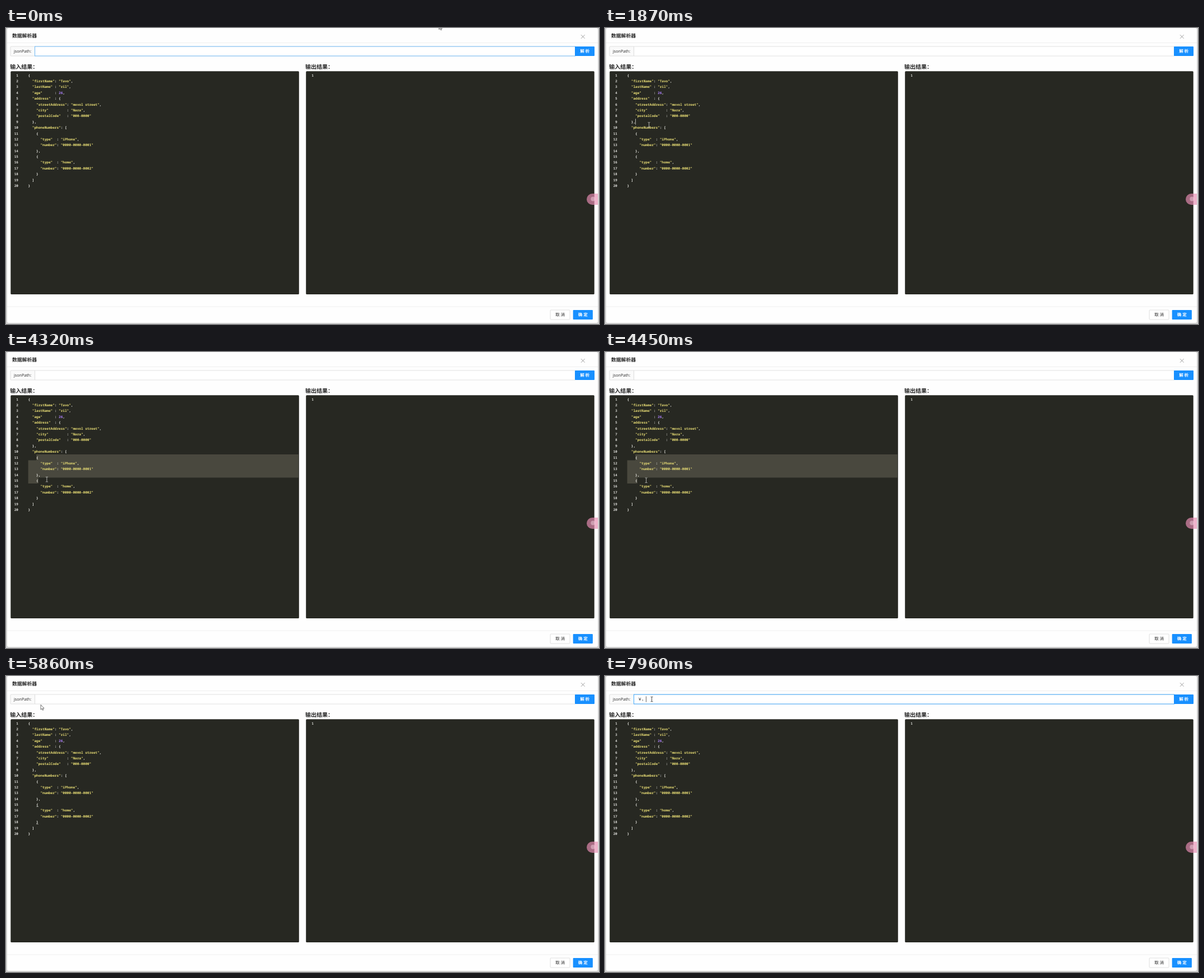
An HTML page that plays this animation: 1058 by 529 pixels, repeating every 8 s.

```html
<!DOCTYPE html>
<html lang="zh-CN">
<head>
<meta charset="utf-8">
<title>数据解析器</title>
<style>
  html, body { margin: 0; height: 100%; overflow: hidden; background: #d2d2d2; }
  svg { display: block; width: 100vw; height: 100vh; }
  text { white-space: pre; text-rendering: geometricPrecision;
    font: 7.6px "Noto Sans CJK SC", "Noto Sans CJK", sans-serif; fill: #262626; }
  .title { font-size: 8.8px; font-weight: 600; }
  .label { font-size: 10px; font-weight: 700; }
  .latin { font: 7.2px "Open Sans", sans-serif; }
  .mid { text-anchor: middle; }
  .white { fill: #fff; font-weight: 600; }
  .code text { font: 600 6.05px "Noto Sans Mono", monospace; fill: #f8f8f2; }
  .code .num { text-anchor: end; fill: #d8d8d4; }
  .str { fill: #e6db74; }
  .int { fill: #ae81ff; }
  .box { stroke: #d9d9d9; stroke-width: .8; fill: #fff; }
</style>
</head>
<body>
<svg viewBox="0 0 1058 529">
  <rect x="2" y="0" width="1054" height="527" rx="3" fill="#fefefe"/>
  <path d="M2 26.5H1056M2 498H1056" stroke="#eee" stroke-width=".9"/>
  <text class="title" x="11" y="16.9">数据解析器</text>
  <path d="M1026 12.2l6.6 6.6m0-6.6l-6.6 6.6" stroke="#858585" stroke-width=".8"/>

  <rect class="box" x="8" y="33" width="43.5" height="17" rx="1" style="fill:#fafafa"/>
  <text class="latin" x="14" y="44.1">jsonPath:</text>
  <rect class="box" x="51.5" y="33" width="964" height="17"/>
  <rect id="focus" x="51.5" y="33" width="964" height="17" fill="none" stroke="#40a9ff"/>
  <text id="typed" x="58.5" y="44.2" style="font-size:7.3px"></text>
  <rect x="1015" y="33" width="35" height="17" rx="1" fill="#1890ff"/>
  <text class="mid white" x="1032.6" y="44.3">解 析</text>

  <text class="label" x="7.2" y="73">输入结果：</text>
  <text class="label" x="534" y="73">输出结果：</text>
  <g fill="#272822">
    <rect x="8.3" y="77.3" width="514.5" height="398.6" rx="1.5"/>
    <rect x="535.2" y="77.3" width="514.5" height="398.6" rx="1.5"/>
  </g>
  <path id="selection" fill="#49483e"/>
  <g class="code" id="code"><text class="num" x="549" y="86.7">1</text></g>
  <path id="brackets" stroke="#f8f8f2" stroke-width=".6"/>
  <rect id="caret" width=".7" height="10.4"/>

  <path d="M1056 296h-10a10 10 0 0 0 0 20h10z" fill="#e88eb2" opacity=".68"/>
  <circle cx="1047.3" cy="305.6" r="4" fill="#f3cfde" opacity=".5"/>

  <rect class="box" x="971.2" y="504" width="34.8" height="17" rx="1"/>
  <text class="mid" x="988.7" y="515.3">取 消</text>
  <rect x="1011.7" y="504" width="35.2" height="17" rx="1" fill="#1890ff"/>
  <text class="mid white" x="1029.3" y="515.3">确 定</text>

  <path id="arrow" d="M0 0V8.6L2 6.8L3.4 9.8L4.7 9.2L3.4 6.3H6Z" fill="#fff" stroke="#333" stroke-width=".7"/>
  <path id="beam" d="M-2-4.3H-.5L0-3.9L.5-4.3H2M0-3.9V3.9M-2 4.3H-.5L0 3.9L.5 4.3H2" fill="none" stroke-width=".8"/>
</svg>
<script>
const $ = id => document.getElementById(id);
const LOOP = 8000, BLINK = 530, FADE = 300, FOCUS = 6130;
const LEFT = 39.6, RIGHT = 521.8, TOP = 79.2, CHAR = 3.63, ROW = 10.38;
const lines = `{
  "firstName": "Tavo",
  "lastName" : "ril",
  "age"      : 26,
  "address"  : {
    "streetAddress": "mevol street",
    "city"         : "Nara",
    "postalCode"   : "000-0000"
  },
  "phoneNumbers": [
    {
      "type"  : "iPhone",
      "number": "0000-0000-0001"
    },
    {
      "type"  : "home",
      "number": "0000-0000-0002"
    }
  ]
}`.split("\n");

const colX = col => LEFT + col * CHAR;
const rowY = row => TOP + row * ROW;
const clamp = (v, lo, hi) => Math.max(lo, Math.min(hi, v));
const between = (v, a, b) => v >= a && v < b;
const show = (el, on) => el.style.display = on ? "" : "none";
const place = (el, x, y) => el.setAttribute("transform", `translate(${x} ${y})`);

const paint = s => s.replace(/"[^"]*"|\d+/g, m =>
  `<tspan class="${m[0] === '"' ? "str" : "int"}">${m}</tspan>`);
$("code").innerHTML += lines.map((s, i) => {
  const y = rowY(i) + 7.5;
  return `<text class="num" x="22" y="${y}">${i + 1}</text><text x="${LEFT}" y="${y}">${paint(s)}</text>`;
}).join("");

// pointer moves: begin, end, x, y; it rests in between
const moves = [
  [40, 800, 43, 137], [890, 1120, 46, 127], [1270, 1400, 57, 170],
  [1680, 1870, 78.5, 173], [1870, 2380, 72, 179],
  [2900, 3330, 147.5, 202.5], [3330, 3700, 55, 189],
  [3750, 4450, 73.5, 229], [4450, 4740, 77, 258],
  [5480, 5860, 62, 51.5], [5860, FOCUS, 70, 41.5], [6330, 6460, 83.5, 41.5]
];

function pointerAt(t) {
  let x = 772.5, y = -6;
  for (const [begin, end, toX, toY] of moves) {
    const k = clamp((t - begin) / (end - begin), 0, 1), ease = k * (2 - k);
    x += (toX - x) * ease;
    y += (toY - y) * ease;
  }
  return [x, y];
}

// row and column under a point
function cellAt([x, y]) {
  const row = clamp(Math.floor((y - TOP) / ROW), 0, lines.length - 1);
  return [row, clamp(Math.round((x - LEFT) / CHAR), 0, lines[row].length)];
}

function selectionPath([r0, c0], [r1, c1]) {
  let d = "";
  for (let r = r0; r <= r1; r++) {
    const x = r === r0 ? colX(c0) : LEFT, end = r === r1 ? colX(c1) : RIGHT;
    d += `M${x} ${rowY(r)}H${end}v${ROW + .05}H${x}z`;
  }
  return d;
}

function selectionAt(t) {
  if (between(t, 1270, 1400)) return selectionPath([4, 2], cellAt(pointerAt(t)));
  if (between(t, 2670, 3750)) return selectionPath([9, 3], [9, 15]);
  if (between(t, 3750, 5300)) return selectionPath([10, 4], cellAt(pointerAt(t)));
  return "";
}

// blinks from its start on; an editor caret follows a click, the input caret follows the text
function caretAt(t, typed) {
  const click = [[1400, 2400], [2520, 2670], [5300, FOCUS]].find(([a, b]) => between(t, a, b));
  const since = click ? click[0] : [FOCUS, 7400, 7960][typed.length];
  if (t < since || Math.floor((t - since) / BLINK) % 2) return null;
  if (!click) return [58.3 + 7.3 * typed.length, 36.3, "#222"];
  const [row, col] = cellAt(pointerAt(since));
  return [colX(col), rowY(row), "#f8f8f0"];
}

function draw(t) {
  const [x, y] = pointerAt(t);
  const inInput = between(x, 52, 1015) && between(y, 33, 50);
  const inEditor = between(y, 77, 476) && (between(x, 28, 523) || between(x, 555, 1050));
  show($("beam"), inInput || inEditor);
  show($("arrow"), !inInput && !inEditor);
  place($("beam"), x, y);
  place($("arrow"), x, y);
  $("beam").setAttribute("stroke", inInput ? "#222" : "#d0d0cc");

  const fade = t < FOCUS ? .7 - t / FADE : (t - FOCUS) / FADE;
  $("focus").setAttribute("opacity", clamp(fade, 0, 1));
  const typed = t < 7400 ? "" : t < 7960 ? "￥" : "￥。";
  $("typed").textContent = typed;
  $("selection").setAttribute("d", selectionAt(t));
  $("brackets").setAttribute("d", between(t, 5300, FOCUS)
    ? [14, 17].map(r => `M${colX(4)} ${rowY(r) + 8.9}h${CHAR}`).join("") : "");

  const caret = caretAt(t, typed);
  show($("caret"), caret);
  if (caret) {
    place($("caret"), caret[0], caret[1]);
    $("caret").setAttribute("fill", caret[2]);
  }
}

const start = performance.now();
function tick() {
  draw((performance.now() - start) % LOOP);
  requestAnimationFrame(tick);
}
tick();
</script>
</body>
</html>
```
